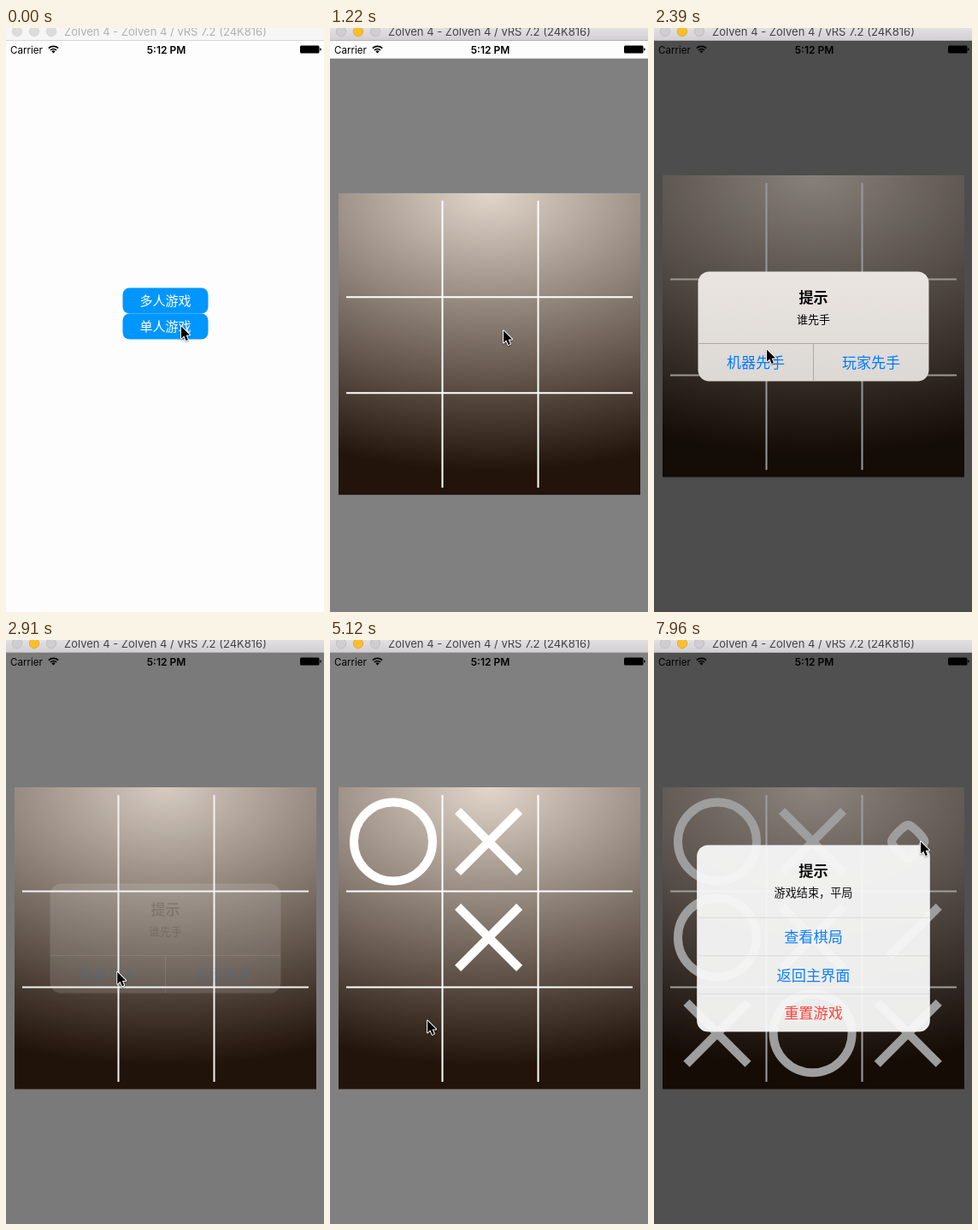
An HTML page with a canvas that plays this animation: 372 by 682 pixels, repeating every 8000 ms.

```html
<!DOCTYPE html>
<html lang="zh">
<head>
<meta charset="utf-8">
<style>
html, body { margin: 0; width: 100%; height: 100%; overflow: hidden; background: #fdfdfd; }
canvas { display: block; }
</style>
</head>
<body>
<canvas id="stage" width="372" height="682"></canvas>
<script>
const W = 372, H = 682, LOOP = 8000, MID = 186.5;
const ctx = document.getElementById('stage').getContext('2d');
const LATIN = 'Inter, Roboto, sans-serif';
const CJK = '"Noto Sans CJK SC", "Noto Sans CJK", sans-serif';
const BLUE = '#007aff', RED = '#ff3b30';

// Pointer path: time, x, y of the tip
const POINTER = [
  [170, 204, 347], [450, 206, 350], [780, 202, 352], [1700, 202, 352],
  [2390, 131, 374], [2650, 128, 387], [2830, 128, 387], [3620, 171, 364],
  [3850, 171, 364], [4240, 88, 238], [4700, 88, 238], [4950, 98, 476],
  [5120, 113, 443], [5210, 150, 452], [5300, 181, 452], [5800, 181, 452],
  [6060, 155, 316], [6280, 139, 345], [6630, 107.5, 345], [7080, 107.5, 345],
  [7610, 311, 234]
];

// Marks: kind, column, row, start time
const MARKS = [
  ['X', 1, 1, 3830],
  ['O', 0, 0, 4400], ['X', 1, 0, 4400],
  ['O', 1, 2, 5440], ['X', 2, 2, 5440],
  ['O', 0, 1, 6760], ['X', 0, 2, 6760],
  ['O', 2, 0, 7805], ['X', 2, 1, 7800]
];

const ALERTS = [
  { show: 1480, hide: 2780, title: '提示', message: '谁先手', sideBySide: true,
    actions: [['机器先手', BLUE], ['玩家先手', BLUE]] },
  { show: 3180, hide: 3795, title: '选择模式',
    actions: [['你不可能赢模式', RED], ['呆瓜电脑模式', BLUE]] },
  { show: 7785, hide: 9000, title: '提示', message: '游戏结束，平局',
    actions: [['查看棋局', BLUE], ['返回主界面', BLUE], ['重置游戏', RED]] }
];

const clamp = v => Math.max(0, Math.min(1, v));

// Remaining distance of a critically damped spring, 1 -> 0
function spring(ms, tau) {
  const x = Math.max(0, ms) / tau;
  return (1 + x) * Math.exp(-x);
}

function rect(x, y, w, h, fill) {
  ctx.fillStyle = fill;
  ctx.fillRect(x, y, w, h);
}

function roundRect(x, y, w, h, r, fill) {
  ctx.beginPath();
  ctx.roundRect(x, y, w, h, r);
  ctx.fillStyle = fill;
  ctx.fill();
}

function line(x1, y1, x2, y2, width, color) {
  ctx.beginPath();
  ctx.moveTo(x1, y1);
  ctx.lineTo(x2, y2);
  ctx.lineWidth = width;
  ctx.strokeStyle = color;
  ctx.stroke();
}

function label(str, x, y, font, color, align = 'left') {
  ctx.font = font;
  ctx.fillStyle = color;
  ctx.textAlign = align;
  ctx.fillText(str, x, y);
}

// Chinese text centred on a point
function centred(str, x, y, size, color, weight = 400) {
  label(str, x, y + size * 0.37, `${weight} ${size}px ${CJK}`, color, 'center');
}

function drawMenu() {
  rect(0, 15, W, H - 15, '#fdfdfd');
  ['多人游戏', '单人游戏'].forEach((str, i) => {
    const y = 303.5 + i * 30;
    roundRect(136.5, y, 100, 30, 8, '#0096ff');
    centred(str, MID, y + 15, 15, '#fff');
  });
}

function drawO(x, y, q) {
  const r = 46 * q, c = r * 0.552 * q;
  ctx.beginPath();
  ctx.moveTo(x, y - r);
  ctx.bezierCurveTo(x + c, y - r, x + r, y - c, x + r, y);
  ctx.bezierCurveTo(x + r, y + c, x + c, y + r, x, y + r);
  ctx.bezierCurveTo(x - c, y + r, x - r, y + c, x - r, y);
  ctx.bezierCurveTo(x - r, y - c, x - c, y - r, x, y - r);
  ctx.closePath();
  ctx.lineWidth = 10;
  ctx.strokeStyle = '#fff';
  ctx.stroke();
}

function drawX(x, y, q) {
  const a = 36, first = 72 * clamp(q * 2), second = 72 * clamp(q * 2 - 1);
  line(x + a, y - a, x + a - first, y - a + first, 10, '#fff');
  if (second) line(x - a, y - a, x - a + second, y - a + second, 10, '#fff');
}

function drawBoard(t) {
  rect(0, 15, W, H, '#808080');
  ctx.save();
  ctx.beginPath();
  ctx.rect(10, 172, 353, 352.5);
  ctx.clip();
  ctx.translate(MID, 172);
  ctx.scale(1.56, 1);
  const glow = ctx.createRadialGradient(0, 0, 0, 0, 0, 325);
  glow.addColorStop(0, '#e2d6cb');
  glow.addColorStop(1, '#22140a');
  rect(-180, 0, 360, 353, glow);
  ctx.restore();

  for (let i = 0; i < 2; i++) {
    const x = 131.5 + i * 112, y = 293.5 + i * 112;
    line(x, 181, x, 516, 2, '#fff');
    line(19, y, 354, y, 2, '#fff');
  }
  for (const [kind, col, row, start] of MARKS) {
    if (t <= start) continue;
    const x = 74 + col * 111.6, y = 235.5 + row * 111.9;
    if (kind === 'O') drawO(x, y, clamp((t - start) / 370));
    else drawX(x, y, clamp((t - start) / 400));
  }
}

function drawStatus() {
  label('Carrier', 5, 29.5, `400 11.6px ${LATIN}`, '#000');
  label('5:12 PM', 187.5, 29.5, `600 12px ${LATIN}`, '#000', 'center');

  const up = -Math.PI / 2, spread = 0.76;
  ctx.strokeStyle = ctx.fillStyle = '#000';
  ctx.lineWidth = 1.7;
  for (const r of [5.1, 8.2]) {
    ctx.beginPath();
    ctx.arc(55.5, 29.6, r, up - spread, up + spread);
    ctx.stroke();
  }
  ctx.beginPath();
  ctx.moveTo(55.5, 29.6);
  ctx.arc(55.5, 29.6, 3.1, up - spread, up + spread);
  ctx.fill();

  roundRect(344, 20.5, 22.5, 9, 1.5, '#000');
  roundRect(367.2, 23.5, 1.4, 3, 0.7, '#000');
}

function drawAlert(alert, t) {
  const { show, hide, title, message, sideBySide, actions } = alert;
  if (t < show || t > hide + 350) return;
  const entering = spring(t - show, 37);
  const alpha = t < hide ? 1 - entering : spring(t - hide, 37);
  const settled = t > show + 400 && t < hide;
  const head = message ? 84 : 68;
  const height = head + 44 * (sideBySide ? 1 : actions.length);
  const top = -height / 2;

  rect(0, 15, W, H, `rgba(0,0,0,${0.4 * alpha})`);
  ctx.save();
  ctx.globalAlpha = alpha;
  ctx.translate(MID, 348.5);
  ctx.scale(1 + 0.2 * entering, 1 + 0.2 * entering);

  let fill = '#f8f8f8', rule = '#dadada';
  if (settled) {
    fill = ctx.createLinearGradient(0, top, 0, -top);
    fill.addColorStop(0, '#eae5e1');
    fill.addColorStop(1, '#dcd8d3');
    rule = '#b5a698';
  }
  roundRect(-135, top, 270, height, 13, fill);
  centred(title, 0, top + 30, 17, '#000', 600);
  if (message) centred(message, 0, top + 55.5, 13, '#000');

  const body = top + head;
  if (sideBySide) {
    line(-135, body, 135, body, 1, rule);
    line(0, body, 0, -top, 1, rule);
  }
  actions.forEach(([str, color], i) => {
    const y = body + (sideBySide ? 0 : 44 * i);
    if (!sideBySide) line(-135, y, 135, y, 1, rule);
    centred(str, sideBySide ? 135 * i - 67.5 : 0, y + 22.5, 17, color);
  });
  ctx.restore();
}

function drawTitleBar(active) {
  let fill = '#f6f6f6';
  if (active) {
    fill = ctx.createLinearGradient(0, 0, 0, 14);
    fill.addColorStop(0, '#e2e0e2');
    fill.addColorStop(1, '#d2d0d2');
  }
  rect(0, 0, W, 14, fill);
  rect(0, 14, W, 1, active ? '#b4b2b4' : '#d6d6d6');
  [13, 33, 53].forEach((x, i) => {
    const amber = active && i === 1;
    ctx.beginPath();
    ctx.arc(x, 4, 5.7, 0, Math.PI * 2);
    ctx.fillStyle = amber ? '#fdbe2e' : active ? '#d0ced0' : '#dcdcdc';
    ctx.fill();
    ctx.lineWidth = 0.8;
    ctx.strokeStyle = amber ? '#e2a325' : active ? '#bbb9bb' : '#d2d2d2';
    ctx.stroke();
  });
  label('Zolven 4 - Zolven 4 / vRS 7.2 (24K816)', 68, 9, `400 13px ${LATIN}`,
    active ? '#444' : '#b0b0b0');
}

function pointerAt(t) {
  const i = POINTER.findIndex(p => p[0] > t);
  if (i === 0) return POINTER[0].slice(1);
  if (i < 0) return POINTER[POINTER.length - 1].slice(1);
  const [t0, x0, y0] = POINTER[i - 1], [t1, x1, y1] = POINTER[i];
  const u = (t - t0) / (t1 - t0), e = u * u * (3 - 2 * u);
  return [x0 + (x1 - x0) * e, y0 + (y1 - y0) * e];
}

function drawPointer(t) {
  const [x, y] = pointerAt(t);
  ctx.save();
  ctx.translate(x + 1, y + 1.5);
  ctx.beginPath();
  ctx.moveTo(0, 0);
  for (const [px, py] of [[0, 14], [3.3, 11], [5.6, 16.4], [7.9, 15.4], [5.6, 10.2], [10, 10]])
    ctx.lineTo(px, py);
  ctx.closePath();
  ctx.lineWidth = 2;
  ctx.lineJoin = 'round';
  ctx.strokeStyle = '#fff';
  ctx.shadowColor = 'rgba(0,0,0,.4)';
  ctx.shadowBlur = 2;
  ctx.shadowOffsetY = 1;
  ctx.stroke();
  ctx.shadowColor = 'transparent';
  ctx.fillStyle = '#000';
  ctx.fill();
  ctx.restore();
}

function draw(t) {
  drawMenu();
  if (t > 930) {
    ctx.save();
    ctx.translate(0, t < 1450 ? 667 * spring(t - 930, 54.7) : 0);
    drawBoard(t);
    ctx.restore();
  }
  drawStatus();
  ALERTS.forEach(alert => drawAlert(alert, t));
  drawTitleBar(t >= 170);
  drawPointer(t);
}

const begin = performance.now();
function tick() {
  draw((performance.now() - begin) % LOOP);
  requestAnimationFrame(tick);
}
tick();
</script>
</body>
</html>
```
